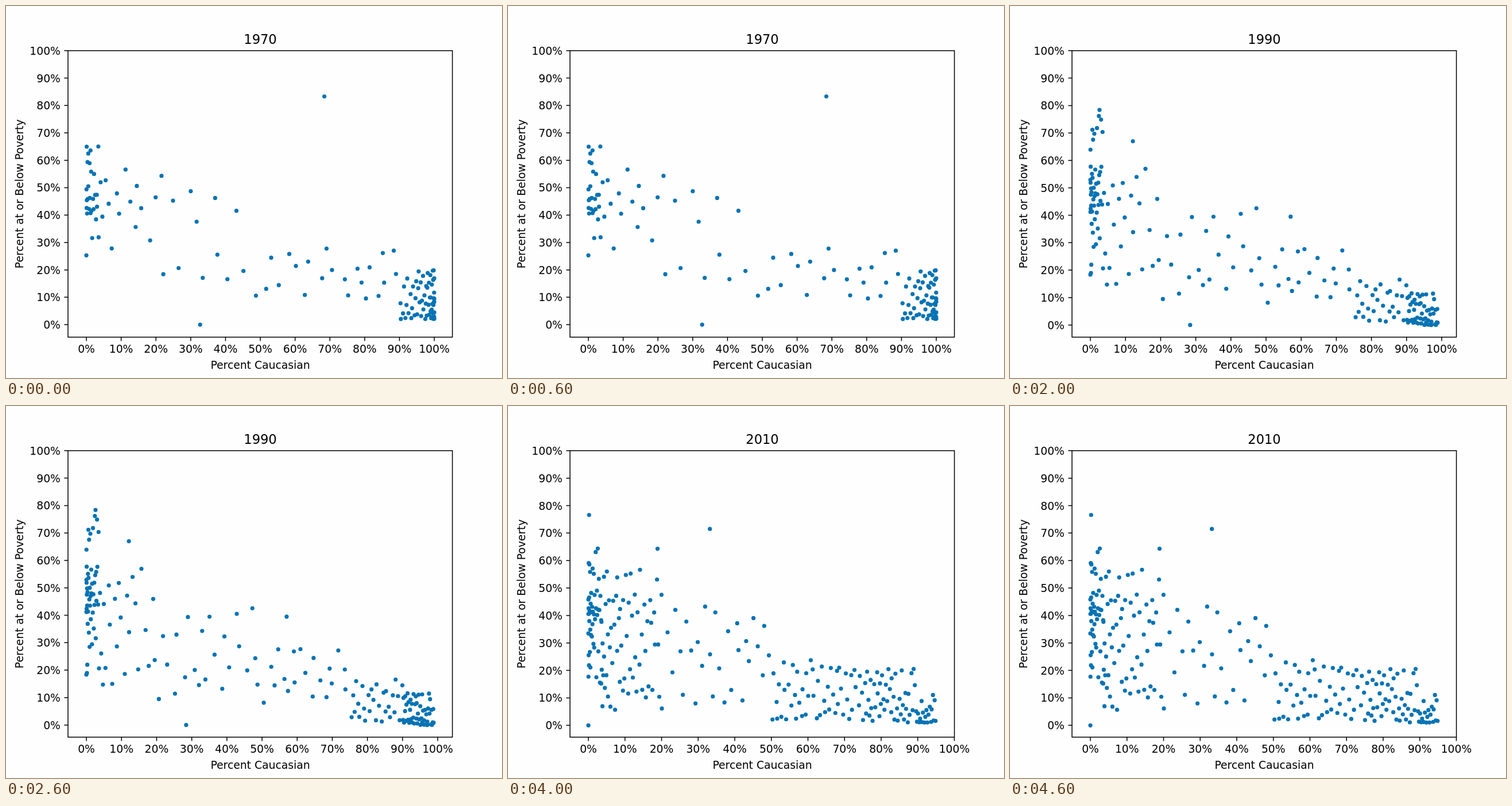
Write an HTML page that moves like this. It is 864 px wide and 648 px high and loops after 5000 ms.

```html
<!DOCTYPE html>
<html lang="en">
<head>
<meta charset="utf-8">
<title>Poverty by decade</title>
<style>
  html, body { margin: 0; width: 100%; height: 100%; overflow: hidden; background: #fefefe; }
  svg { display: block; width: 864px; height: 648px; }
  text { font: 18.75px "DejaVu Sans", sans-serif; fill: #000; text-anchor: middle; }
  .title { font-size: 22.5px; }
  .tick { text-anchor: end; }
  .line { fill: none; stroke: #000; stroke-width: 1.5; }
  .dot { fill: #0573b4; }
</style>
</head>
<body>
<svg id="chart" viewBox="0 0 864 648">
  <rect class="line" x="108" y="77.8" width="669.6" height="499"/>
  <text x="443" y="631.5">Percent Caucasian</text>
  <text transform="translate(30 327.3) rotate(-90)">Percent at or Below Poverty</text>
</svg>
<script>
const HOLD = 1000;
const LEFT = 108, TOP = 77.8, BOTTOM = 576.8;
const ZERO = 140, LAST_DOT = 746;
const BANDS = [0, 3.5, 20, 50, 75, 90];
const chart = document.getElementById('chart');
const slides = [];

function add(parent, tag, attrs, text) {
  const node = document.createElementNS('http://www.w3.org/2000/svg', tag);
  for (const key in attrs) node.setAttribute(key, attrs[key]);
  if (text) node.textContent = text;
  return parent.appendChild(node);
}

function seeded(seed) {
  return () => (seed = (seed * 16807) % 2147483647) / 2147483647;
}

// Distribution of a dot within its band, from two even values in 0..1.
function shape(band, u, v, pack) {
  if (band === 0) return [u ** 1.8, 0.5 + 4 * (v - 0.5) ** 3 * 0.6 + (v - 0.5) * 0.4];
  if (band === 1) return [u ** 1.4, v];
  if (band === 4) return [u, v ** 1.4];
  if (band === 5) return [1 - u ** pack, v ** 1.9];
  return [u, v];
}

function axes(g, px, py) {
  for (let p = 0; p <= 100; p += 10) {
    const x = px(p), y = py(p), label = p + '%';
    add(g, 'path', { class: 'line', d: `M${x} ${BOTTOM}v6.6M${LEFT} ${y}h-6.6` });
    add(g, 'text', { x, y: 604.3 }, label);
    add(g, 'text', { class: 'tick', x: 94.9, y: y + 7 }, label);
  }
}

// spread: count, lowest and highest poverty per band; lone: [x, y] in percent.
function addYear(year, full, pack, lone, spread) {
  const g = add(chart, 'g', {});
  const rnd = seeded(year * 7919);
  const base = 555.1 + slides.length * 0.3;
  const px = p => ZERO + (full - ZERO) * p / 100;
  const py = p => base + (TOP - base) * p / 100;
  const end = 100 * (LAST_DOT - ZERO) / (full - ZERO);
  const dot = (x, y) => add(g, 'circle', { class: 'dot', cx: px(x), cy: py(y), r: 3.6 });

  add(g, 'text', { class: 'title', x: 443, y: 66.4 }, String(year));
  axes(g, px, py);
  lone.forEach(([x, y]) => dot(x, y));
  spread.forEach(([n, low, high], band) => {
    const from = BANDS[band], to = BANDS[band + 1] || end;
    for (let i = 0; i < n; i++) {
      const [u, v] = shape(band, (i + rnd()) / n, (i * 0.618 + rnd() * 0.25) % 1, pack);
      dot(from + (to - from) * u, low + (high - low) * v);
    }
  });
  slides.push(g);
}

addYear(1970, 746, 2.4,
  [[68.4, 83.3], [32.7, 0], [1.2, 63.6], [21.6, 54.3]],
  [[25, 24, 67], [15, 24, 57], [12, 10, 54], [11, 9, 28], [10, 9, 28], [60, 2, 20]]);

addYear(1980, 746, 1,
  [[82.2, 82.3], [2, 74], [17.2, 66.4], [0, 0]],
  [[36, 21, 69], [18, 12, 58], [7, 7, 41], [24, 5, 35], [34, 0, 33], [46, 0, 16]]);

addYear(1990, 752, 1,
  [[2.6, 78.4], [12.1, 67], [28.4, 0], [57, 39.5]],
  [[46, 18, 77], [24, 12, 58], [22, 8, 43], [19, 6, 28], [28, 1, 17], [50, 0, 12]]);

addYear(2000, 758.7, 1,
  [[3.1, 78.5], [13, 63], [30.5, 62.4], [79.7, 27.9]],
  [[44, 9, 70], [33, 9, 50], [40, 2, 38], [25, 1, 24], [48, 1, 18], [34, 0, 12]]);

addYear(2010, 777.5, 1,
  [[0.2, 76.6], [33.2, 71.5], [18.9, 64.3], [0, 0]],
  [[45, 15, 67], [62, 5, 57], [29, 6, 45], [50, 1, 24], [46, 1, 21], [18, 1, 12]]);

function show(now) {
  const current = Math.floor(now / HOLD) % slides.length;
  slides.forEach((g, i) => g.setAttribute('display', i === current ? 'inline' : 'none'));
}

function tick() {
  show(performance.now());
  requestAnimationFrame(tick);
}

show(0);
requestAnimationFrame(tick);
</script>
</body>
</html>
```
